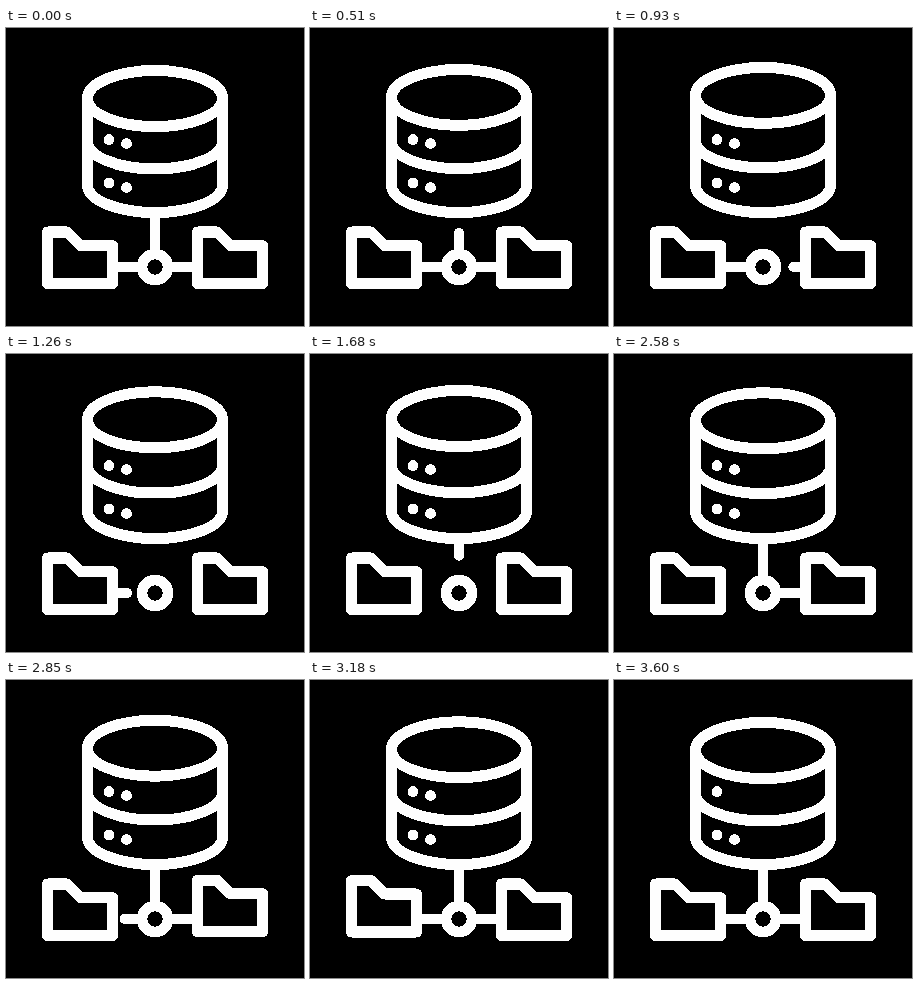
An HTML page with a canvas that plays this animation: 298 by 298 pixels, repeating every 3.63 s.

```html
<!DOCTYPE html>
<html lang="en">
<head>
<meta charset="utf-8">
<title>Database network</title>
<style>
  html, body { margin: 0; width: 100%; height: 100%; overflow: hidden; background: #000; }
  canvas { display: block; width: 298px; height: 298px; }
</style>
</head>
<body>
<canvas width="298" height="298"></canvas>
<script>
const LOOP = 3630, SIZE = 298;
const CX = 149, RX = 67.5, HUB_Y = 239;
const ctx = document.querySelector('canvas').getContext('2d', { willReadFrequently: true });

const progress = (t, from, to) => Math.min(1, Math.max(0, (t - from) / (to - from)));
const bump = (t, from, to) => Math.sin(Math.PI * progress(t, from, to));
const mix = (a, b, p) => a + (b - a) * p;

function stroke(width, build, cap = 'round') {
  ctx.lineWidth = width;
  ctx.lineCap = cap;
  ctx.beginPath();
  build();
  ctx.stroke();
}

function dot(x, y) {
  ctx.beginPath();
  ctx.arc(x, y, 5.4, 0, Math.PI * 2);
  ctx.fill();
}

function folder(x, lift) {
  const y = 204 - lift;
  stroke(11, () => {
    ctx.moveTo(x, y);
    ctx.lineTo(x + 19.5, y);
    ctx.lineTo(x + 33, y + 13.5);
    ctx.lineTo(x + 65, y + 13.5);
    ctx.lineTo(x + 65, y + 51.5);
    ctx.lineTo(x, y + 51.5);
    ctx.closePath();
  });
}

// A link shrinks towards its far end, then grows out again from its near end.
function link(t, [x1, y1], [x2, y2], outFrom, outTo, inFrom, inTo) {
  const start = t < inFrom ? progress(t, outFrom, outTo) : 0;
  const end = t < inFrom ? 1 : progress(t, inFrom, inTo);
  if (start === 1 || end === 0) return;
  stroke(10, () => {
    ctx.moveTo(mix(x1, x2, start), mix(y1, y2, start));
    ctx.lineTo(mix(x1, x2, end), mix(y1, y2, end));
  });
}

function database(t) {
  const lift = 3 * (1 - Math.cos(2 * Math.PI * t / LOOP));
  const top = 70.5 - lift, middle = 113.5 - lift * 0.4, bottom = 157;

  stroke(11, () => ctx.ellipse(CX, top, RX, 28, 0, 0, Math.PI * 2));
  stroke(11, () => ctx.ellipse(CX, middle, RX, 27.5, 0, 0, Math.PI), 'butt');
  stroke(11, () => {
    ctx.moveTo(CX + RX, top);
    ctx.lineTo(CX + RX, bottom);
    ctx.ellipse(CX, bottom, RX, 27.5, 0, 0, Math.PI);
    ctx.lineTo(CX - RX, top);
  }, 'butt');

  dot(103, 111.5);
  if (t < 3540) dot(120.5, 115.5);
  dot(103, 155);
  dot(120.5, 159.5);
}

// Hard, unsmoothed edges: every pixel becomes black or white.
function sharpen() {
  const image = ctx.getImageData(0, 0, SIZE, SIZE);
  const data = image.data;
  for (let i = 0; i < data.length; i += 4) {
    data[i] = data[i + 1] = data[i + 2] = data[i] > 127 ? 254 : 0;
  }
  ctx.putImageData(image, 0, 0);
}

function draw(t) {
  ctx.fillStyle = '#000';
  ctx.fillRect(0, 0, SIZE, SIZE);
  ctx.fillStyle = ctx.strokeStyle = '#fff';
  ctx.lineJoin = 'round';

  database(t);
  link(t, [CX, 186], [CX, 224], 300, 720, 1530, 1890);
  link(t, [163, HUB_Y], [191, HUB_Y], 720, 1080, 2250, 2610);
  link(t, [135, HUB_Y], [107, HUB_Y], 1080, 1440, 2640, 3000);

  const hubRadius = 13 + 2 * bump(t, 1890, 2430);
  stroke(10.5, () => ctx.arc(CX, HUB_Y, hubRadius, 0, Math.PI * 2));
  folder(41.5, 4 * bump(t, 3000, 3540));
  folder(191.5, 4 * bump(t, 2640, 3180));
  sharpen();
}

function frame(now) {
  draw(Math.floor((now % LOOP) / 30) * 30);
  requestAnimationFrame(frame);
}

draw(0);
requestAnimationFrame(frame);
</script>
</body>
</html>
```
